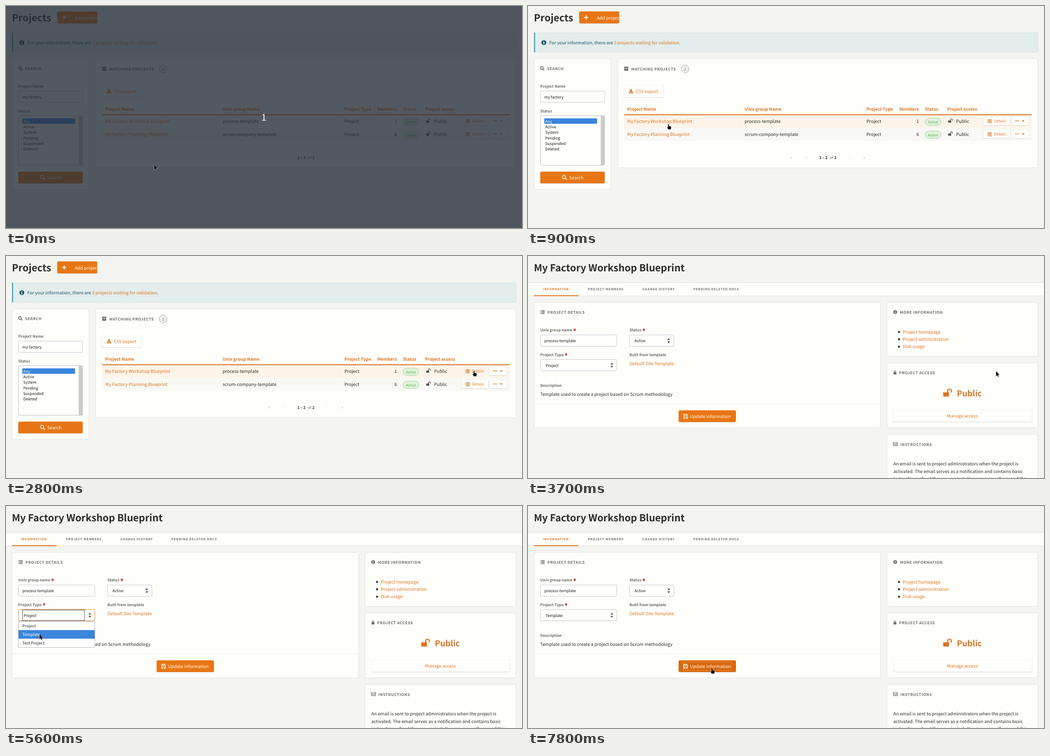
An HTML page for the animation above (8000 ms loop, 1139 by 492 pixels).

```html
<!DOCTYPE html>
<html lang="en">
<head>
<meta charset="utf-8">
<title>Project administration</title>
<style>
html, body { margin: 0; width: 100%; height: 100%; overflow: hidden; background: #f4f4f1; }
svg { display: block; width: 1139px; height: 492px; }
text { font-family: "Noto Sans CJK JP", "Noto Sans CJK SC", "Noto Sans CJK", "Noto Sans", sans-serif;
  text-rendering: geometricPrecision; white-space: pre; }
</style>
</head>
<body>
<svg id="stage" viewBox="0 0 1139 492" xmlns="http://www.w3.org/2000/svg"></svg>
<script>
const ORANGE = '#e87614', LINK = '#dd7421', DARK = '#2b2d27', GREY = '#6a6c68',
  PANE = '#fefffb', LINE = '#e2e3df', BLUE = '#3b85dc', LOOP = 8000;
const SCALE = 0.8945; // Latin letters in this family are drawn large for their em
const BASE = 11, SMALL = 9.63;

const rect = (x, y, w, h, fill, more = '') =>
  `<rect x="${x}" y="${y}" width="${w}" height="${h}" fill="${fill}" ${more}/>`;
const path = (d, fill, more = '') => `<path d="${d}" fill="${fill}" ${more}/>`;
const line = (d, color, width = 1) => path(d, 'none', `stroke="${color}" stroke-width="${width}"`);
const circle = (x, y, r, fill, more = '') => `<circle cx="${x}" cy="${y}" r="${r}" fill="${fill}" ${more}/>`;
const group = (id, body, more = '') => `<g id="${id}" ${more}>${body}</g>`;
const at = (x, y, body) => `<g transform="translate(${x} ${y})">${body}</g>`;
const text = (x, y, s, size = BASE, fill = DARK, more = '') =>
  `<text x="${x}" y="${y}" font-size="${(size * SCALE).toFixed(2)}" fill="${fill}" ${more}>${s}</text>`;
const bold = (x, y, s, size = BASE, fill = DARK, more = '') =>
  text(x, y, s, size * 0.975, fill, 'font-weight="600" ' + more);
const mid = 'text-anchor="middle"', end = 'text-anchor="end"';

const heading = (x, y, s) => bold(x, y, s, SMALL, GREY, 'letter-spacing=".6"');
const label = (x, y, s) => bold(x, y, s, SMALL, GREY);
const box = (x, y, w, h, fill = PANE, stroke = LINE, r = 3, more = '') =>
  rect(x + .5, y + .5, w - 1, h - 1, fill, `rx="${r}" stroke="${stroke}" ${more}`);
const solid = (x, y, w, h, id = 'b' + x) =>
  rect(x, y + 1, w, h, '#000', 'rx="3" opacity=".12"') + rect(x, y, w, h, ORANGE, `id="${id}" rx="3"`);
const raised = (x, y, w, h) =>
  rect(x - 1, y, w + 2, h + 2, '#000', 'rx="3" opacity=".04"') +
  rect(x - .5, y - .5, w + 1, h + 1.5, '#000', 'rx="3" opacity=".07"') + rect(x, y, w, h, '#fffffd', 'rx="2.5"');

// icons
const lens = (x, y, c, r) => circle(x, y, r, 'none', `stroke="${c}" stroke-width="1.6"`) +
  line(`M${x + r * .7} ${y + r * .7}l${r} ${r}`, c, 2);
const list = (x, y, c) => [0, 2.4, 4.8, 7.2].map(d =>
  rect(x, y + d, 1.4, 1.4, c) + rect(x + 2.3, y + d, 7.2, 1.4, c)).join('');
const info = (x, y, r, c) => circle(x, y, r, c) +
  at(x, y, `<g transform="scale(${r / 5})">` + rect(-.8, -3.3, 1.6, 1.4, PANE) +
    path('M-1.4 -1.1H.8V2H1.5V3H-1.5V2H-.8V-.1H-1.4Z', PANE) + '</g>');
const openLock = (x, y, s, c) => `<g transform="translate(${x} ${y}) scale(${s})">` +
  rect(0, 4.2, 6.6, 4.8, c, 'rx=".6"') + line('M5 4.5V2.7A2.1 2.1 0 0 1 9.2 2.7V4.3', c, 1.3) + '</g>';
const star = (x, y) => line([0, 60, 120].map(a => {
  const u = 2.9 * Math.sin(a * Math.PI / 180), v = 2.9 * Math.cos(a * Math.PI / 180);
  return `M${x - u} ${y - v}L${x + u} ${y + v}`;
}).join(''), '#c9343f', 1.6);
const arrows = (x, y) => path(`M${x - 3} ${y - 1.5}h6l-3 -4.3zM${x - 3} ${y + 1.5}h6l-3 4.3z`, '#55574f');

function row(i, name, unix, count) {
  const y = i * 29.3, b = i * 28.8;
  return rect(212, i ? 270.5 : 242, 900, i ? 28 : 28.5, i ? '#f8f9f4' : PANE, `id="row${i}"`) +
    text(219, 259 + y, name, BASE, LINK) + text(478, 259 + y, unix) + text(747, 259 + y, 'Project') +
    text(863, 259 + y, count, BASE, DARK, end) +
    box(876, 248 + b, 36, 17, '#e2f2de', '#9fd39a', 8) +
    text(894, 259.8 + b, 'Active', 8.64, '#45ad4b', mid) +
    openLock(927.5, 249.6 + b, 1, '#55574f') + text(945, 259 + y, 'Public') +
    group('raise' + i, raised(1005, 246 + b, 59.5, 18)) +
    list(1014, 251 + b, LINK) + text(1028, 258.3 + b, 'Details', SMALL, LINK) +
    raised(1067, 246 + b, 38.5, 18) +
    [0, 3, 6].map(d => rect(1075.3 + d, 253.6 + b, 2.1, 2.1, LINK, 'rx=".5"')).join('') +
    path(`M1090 ${253.4 + b}h6.4l-3.2 3.6z`, LINK);
}

const options = ['Any', 'Active', 'System', 'Pending', 'Suspended', 'Deleted'];
const listPage =
  bold(13, 33.6, 'Projects', 24.7) +
  solid(113, 12, 88.5, 26.5) + line('M124 25.5h9M128.5 21v9', '#fffdf5', 2.2) +
  text(152, 29.6, 'Add project', BASE, '#fffdf5') +
  rect(13, 59, 1113, 43.5, '#e3edec', 'rx="2"') + rect(13, 59, 3, 43.5, '#46b8cd') +
  box(13, 59, 1113, 43.5, 'none', '#d3e3e4', 2) + rect(13, 59, 3, 43.5, '#46b8cd') +
  info(35, 81.2, 5.4, '#1a5163') +
  text(47, 85, `For your information, there are <tspan fill="${LINK}">3 projects waiting for validation</tspan>.`, BASE, '#1a5163') +
  box(13, 116.5, 170.5, 290.5) + lens(30.8, 137.4, GREY, 3) + heading(42, 142, 'SEARCH') +
  label(27, 181.3, 'Project Name') + box(27, 188, 142.5, 26, '#fffffd', '#c3c5cc', 2) +
  text(36, 204.6, 'my factory', SMALL, '#151515') +
  label(27, 236, 'Status') + box(27, 242.5, 142.5, 111, '#fffffd', '#b9bbc3', 2) +
  rect(160.5, 243.5, 8.5, 109, '#cbcbca') + rect(36, 249, 116.5, 12, BLUE) +
  options.map((s, i) => text(38, 258.6 + i * 12.35, s, SMALL, i ? '#151515' : '#fff')).join('') +
  solid(27, 367, 142.5, 26) + lens(79.6, 379, '#fffdf5', 3.6) + text(91, 384.2, 'Search', BASE, '#fffdf5') +
  box(197.5, 116.5, 928.5, 242.5) +
  rect(212, 134.5, 9.6, 2.6, GREY) + path('M212.5 137.8h8.6v5.7h-8.6zM215.3 138.8v1.1h3v-1.1z', GREY, 'fill-rule="evenodd"') +
  heading(228, 142.6, 'MATCHING PROJECTS') +
  circle(346.8, 139.3, 8.6, '#eff0ec', 'stroke="#a9aba6"') + text(346.8, 142.6, '2', 8.64, GREY, mid) +
  raised(212, 176, 87, 26) +
  path('M226 184h2.8v3.4h2.4l-3.8 4-3.8-4h2.4zM222.8 190.2h2.2l2.4 2.2 2.4-2.2h2.2v3.4h-9.2z', LINK) +
  text(238, 193, 'CSV export', BASE, LINK) +
  [[219, 'Project Name'], [478, 'Unix group Name'], [747, 'Project Type'], [876, 'Status'], [925, 'Project access']]
    .map(([x, s]) => bold(x, 232, s, BASE, LINK)).join('') + bold(863, 232, 'Members', BASE, LINK, end) +
  row(0, 'My Factory Workshop Blueprint', 'process-template', 1) +
  row(1, 'My Factory Planning Blueprint', 'scrum-company-template', 6) +
  rect(212, 240, 900, 2, '#d9732a') +
  [[581.5, '«'], [614, '‹'], [710, '›'], [742, '»']].map(([x, s]) => text(x, 338.6, s, BASE, '#efbd8f', mid)).join('') +
  bold(643, 338.8, '1 – 2', SMALL) + text(666, 338.8, 'of', SMALL, GREY) + bold(676, 338.8, '2', SMALL);

const tabs = [[33, 'INFORMATION'], [132, 'PROJECT MEMBERS'], [252.5, 'CHANGE HISTORY'], [365, 'PENDING DELETED DOCS']];
const detailPage =
  bold(13, 33.6, 'My Factory Workshop Blueprint', 24.7) +
  rect(0, 59, 1139, 30, PANE) + rect(0, 58.5, 1139, 1, LINE) + rect(0, 88, 1139, 1, LINE) +
  tabs.map(([x, s], i) => bold(x, 76.4, s, 7.9, i ? GREY : LINK, 'letter-spacing=".85"')).join('') +
  rect(13, 87, 99, 2, '#e07a2a') +
  box(13, 102.5, 765.5, 279) + list(27.3, 120, GREY) + heading(43, 128.3, 'PROJECT DETAILS') +
  label(27, 167.4, 'Unix group name') + star(103, 163.6) +
  box(27, 174.5, 169.5, 26, '#fffffd', '#c3c5cc', 2) + text(36, 191, 'process-template', SMALL, '#151515') +
  label(224, 167.4, 'Status') + star(255.7, 163.6) +
  box(224, 174.5, 98.5, 26, '#fffffd', '#c3c5cc', 2) + text(235, 191, 'Active', SMALL, '#151515') + arrows(310.7, 187.5) +
  label(27, 222, 'Project Type') + star(84, 218.2) +
  box(27, 229, 169.5, 26, '#fffffd', '#c3c5cc', 2, 'id="field"') +
  `<text id="type" x="39" y="245.6" font-size="${SMALL * SCALE}" fill="#151515">Project</text>` + arrows(185, 242) +
  label(224, 222, 'Built from template') + text(224, 241.6, 'Default Site Template', BASE, LINK) +
  label(27, 290.4, 'Description') + text(27, 310, 'Template used to create a project based on Scrum methodology') +
  rect(14, 327, 764, 1, '#edeeea') +
  solid(332.5, 342, 126.5, 26, 'update') +
  line('M343.6 350.6h6.7l2 2v7.4h-8.7zM345.5 350.6v2.8h4v-2.8M345.3 360v-3.4h5.2v3.4', '#fffdf5', 1.1) +
  text(357.5, 358.8, 'Update information', BASE, '#fffdf5') +
  group('focus', rect(342.5, 345.5, 106.5, 19, 'none', 'stroke="#f6cfa6" stroke-width=".8" stroke-dasharray="1 1"')) +
  box(792, 102.5, 334, 120.5) + info(810.5, 124.3, 4.2, GREY) + heading(821, 128.3, 'MORE INFORMATION') +
  ['Project homepage', 'Project administration', 'Disk usage'].map((s, i) =>
    circle(819, 168.2 + i * 16.4, 2.3, DARK) + text(827, 171.6 + i * 16.4, s, BASE, LINK)).join('') +
  box(792, 236.5, 334, 144.5) + rect(806.8, 257.6, 6.4, 4.8, GREY, 'rx=".5"') +
  line('M808.2 258V256.5A1.8 1.8 0 0 1 811.8 256.5V258', GREY, 1.2) + heading(819, 262.3, 'PROJECT ACCESS') +
  openLock(916.5, 294, 1.95, LINK) + bold(946.5, 311, 'Public', 20.5, LINK) +
  raised(806.5, 341.5, 305.5, 25.5) + text(959, 358.4, 'Manage access', BASE, LINK, mid) +
  box(792, 395, 334, 120) +
  line('M806.8 413.2h8.8v7.2h-8.8zM806.8 415l4.4 3.2 4.4-3.2', GREY, 1.1) + heading(822, 420.6, 'INSTRUCTIONS') +
  ['An email is sent to project administrators when the project is',
    'activated. The email serves as a notification and contains basic',
    'instructions about the new project. You can manually resend this']
    .map((s, i) => text(806.5, 464.3 + i * 16.4, s)).join('') +
  group('menu', box(36, 230, 138, 24.5, 'none', '#555', 0) +
    box(27, 255, 169.5, 59, '#fffffd', '#b9bbc3', 0) + rect(27.5, 275, 168.5, 19, BLUE, 'id="mark"') +
    ['Project', 'Template', 'Test Project'].map((s, i) =>
      text(36, 269 + i * 19.2, s, 10.1, '#2b2b2b', `id="opt${i}"`)).join(''));

const pointer = {
  arrow: path('M0 0V11.6L2.6 9.2 4.5 13 6.2 12.2 4.5 8.5H8Z', '#111', 'stroke="#fff" stroke-width=".8" paint-order="stroke"'),
  hand: path('M-1 0Q0 -1 1 0V4L5 4.8Q6.3 5.2 6 7L5.2 11.6H-.4L-3 7.3Q-2.8 5.8 -1 7Z', '#111', 'stroke="#fff" stroke-width=".7" paint-order="stroke"'),
  beam: line('M-2.4 -6H-.8L0 -5.3 .8 -6H2.4M-2.4 6H-.8L0 5.3 .8 6H2.4M0 -5.3V5.3', '#222', 1.1)
};

const stage = document.getElementById('stage');
stage.innerHTML = rect(0, 0, 1139, 492, '#f4f4f1') +
  group('list', listPage) + group('detail', detailPage) +
  group('veil', rect(0, 0, 1139, 492, '#262d37', 'opacity=".79"') + text(569, 254.2, '1', 22.5, '#fff', mid)) +
  group('pointer', Object.entries(pointer).map(([k, v]) => group(k, v)).join(''));

const el = id => document.getElementById(id);
const show = (id, on) => el(id).style.display = on ? '' : 'none';
const paint = (id, fill) => el(id).setAttribute('fill', fill);

// time, x, y
const route = [[0, 327, 351], [300, 327, 351], [400, 319, 343], [500, 319, 343], [900, 310, 262], [1000, 310, 262],
  [1600, 369, 284], [1800, 392, 283], [1900, 392, 283], [2400, 1058, 257], [2500, 1058, 257], [2600, 1033, 255],
  [3900, 1033, 255], [4100, 620, 229], [4200, 454, 258], [4300, 454, 258], [4600, 220, 224], [5000, 80, 243],
  [5200, 80, 243], [5400, 78, 269], [5500, 78, 269], [5600, 74, 284], [6300, 74, 284], [6800, 385, 374],
  [7000, 406, 360], [LOOP, 406, 360]];

function place(t) {
  const i = route.findIndex(k => k[0] > t), [a, b] = [route[i - 1], route[i]];
  const u = (t - a[0]) / (b[0] - a[0]);
  return [a[1] + (b[1] - a[1]) * u, a[2] + (b[2] - a[2]) * u];
}

function draw(now) {
  const t = Math.floor(now % LOOP / 100) * 100;
  const [x, y] = place(t);
  const first = t < 3600, open = t >= 5000 && t < 6000;
  show('veil', t < 400);
  show('list', first);
  show('detail', !first);

  const over = first && y > 242 && y < 298 ? (y < 270.5 ? 0 : 1) : -1;
  paint('row0', over === 0 ? '#fdf4e9' : PANE);
  paint('row1', over === 1 ? '#f9f4e8' : '#f8f9f4');
  show('raise0', t < 2800 || t >= 3200);

  const chosen = t >= 5400 ? 1 : 0;
  show('menu', open);
  el('mark').setAttribute('y', 256 + chosen * 19);
  for (let i = 0; i < 3; i++) paint('opt' + i, i === chosen ? '#fff' : '#2b2b2b');
  el('field').setAttribute('stroke', t >= 5000 && t < 7400 ? '#d9822f' : '#c3c5cc');
  el('type').textContent = t < 6000 ? 'Project' : 'Template';

  const onButton = !first && x > 333 && x < 459 && y > 342 && y < 368;
  paint('update', onButton ? '#d9680c' : ORANGE);
  show('focus', t >= 7400);

  const onLink = over >= 0 && (x < 355 && x > 219 || x > 1005);
  const kind = onLink || onButton || t === 3600 ? 'hand' : over === 1 && x < 420 ? 'beam' : 'arrow';
  for (const k in pointer) show(k, k === kind);
  el('pointer').setAttribute('transform', `translate(${x.toFixed(1)} ${y.toFixed(1)})`);
}

const start = performance.now();
function tick() {
  draw(performance.now() - start);
  requestAnimationFrame(tick);
}
tick();
</script>
</body>
</html>
```
